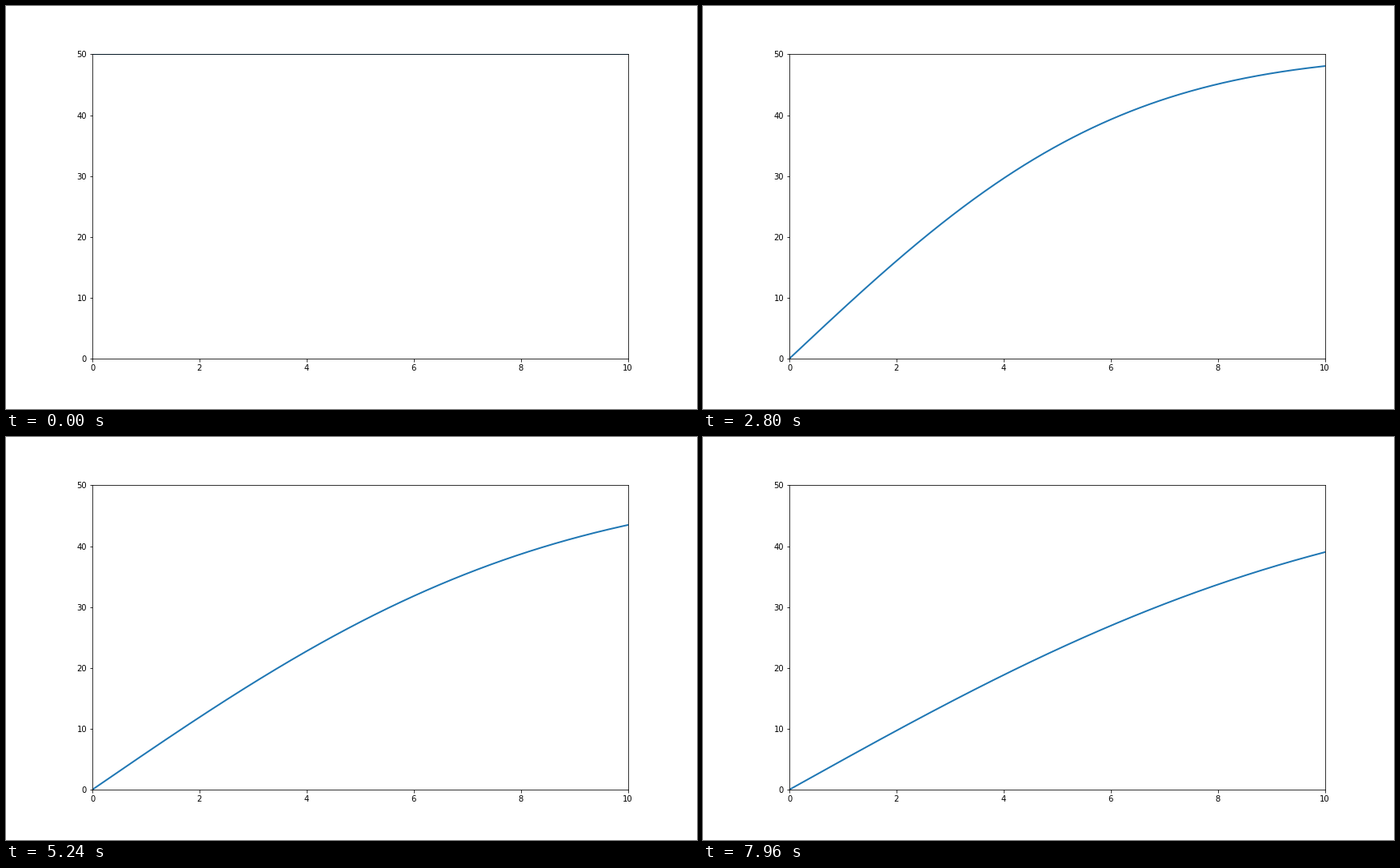
A matplotlib script that plays this animation: 864x504 px, repeating every 8000 ms.

```python
import math

import matplotlib.pyplot as plt
import numpy as np
from matplotlib.animation import FuncAnimation

FRAMES, INTERVAL = 200, 40
SURFACE = 50       # limiting value far from the wall
SPREAD = 1 / 6     # diffusivity times time step

erf = np.vectorize(math.erf)
x = np.linspace(0, 10, 500)


def profile(n):
    """Diffusion profile after n steps; a sharp step at the start."""
    if n == 0:
        return np.where(x > 0, SURFACE, np.nan)
    return SURFACE * erf(x / (2 * math.sqrt(SPREAD * n)))


fig, ax = plt.subplots(figsize=(12, 7), dpi=72)
fig.subplots_adjust(left=0.125, right=0.9, bottom=0.125, top=0.88)
ax.set(xlim=(0, 10), ylim=(0, 50),
       xticks=range(0, 11, 2), yticks=range(0, 51, 10))
line, = ax.plot(x, profile(0), lw=2, color="#1f77b4")


def update(n):
    line.set_ydata(profile(n))
    return line,


anim = FuncAnimation(fig, update, frames=FRAMES, interval=INTERVAL,
                     repeat=True, repeat_delay=0)
plt.show()
```
